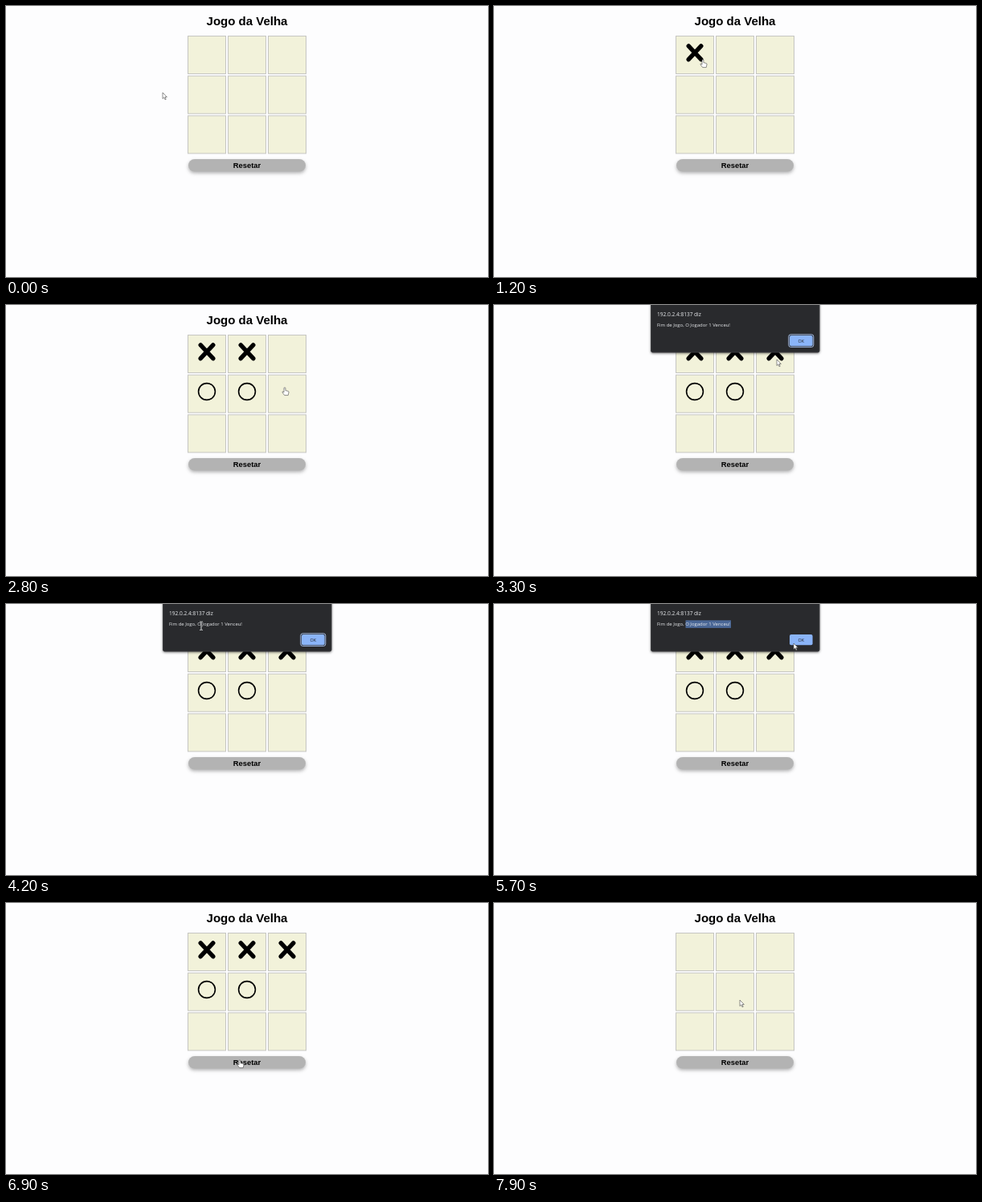
These frames come from a looping animation (600 px wide and 338 px high, 8 s). An HTML page:

```html
<!DOCTYPE html>
<html lang="pt">
<head>
<meta charset="utf-8">
<title>Jogo da Velha</title>
<style>
  html, body { margin: 0; width: 100%; height: 100%; overflow: hidden; background: #fdfdfe; }
  svg { display: block; width: 100vw; height: 100vh; }
  .page { font-family: Arial, "Liberation Sans", sans-serif; font-weight: 700; text-anchor: middle; }
  .cell { fill: #f2f2da; stroke: #c6c6c2; }
  .x { fill: none; stroke: #000; stroke-width: 5.4; stroke-linecap: round; }
  .o { fill: none; stroke: #000; stroke-width: 1.6; }
  .reset { fill: #b3b3b3; filter: drop-shadow(0 2px 2px rgba(0, 0, 0, .3)); }
  .dialog { font-family: "Open Sans", "Noto Sans", sans-serif; fill: #e8eaed; }
  .panel { fill: #292a2d; stroke: #3a3b3e; filter: drop-shadow(0 1px 1.5px rgba(0, 0, 0, .5)); }
  .cursor { fill: #fff; stroke: #444; stroke-width: .6; stroke-linejoin: round; }
</style>
</head>
<body>
<svg viewBox="0 0 600 338">
  <g class="page">
    <text x="300" y="24" font-size="15">Jogo da Velha</text>
    <g id="board"></g>
    <rect class="reset" x="227" y="191" width="146" height="15.5" rx="7.75"/>
    <text x="300" y="202.2" font-size="9.4">Resetar</text>
  </g>
  <g class="dialog" id="dialog">
    <path class="panel" d="M195.5 -2V57q0 2 2 2H403q2 0 2-2V-2Z"/>
    <text x="203" y="14.3" font-size="6.55">192.0.2.4:8137 diz</text>
    <rect id="selection" x="238.5" y="20.3" height="9.6" fill="#4a6796"/>
    <text x="203" y="27.3" font-size="5.95">Fim de Jogo, O Jogador 1 Venceu!</text>
    <rect id="ring" x="366.8" y="36.8" width="31" height="15.6" rx="2.5" fill="none" stroke="#b5cffa" stroke-width=".9"/>
    <rect x="368" y="38" width="28.6" height="13.2" rx="2" fill="#8ab4f8"/>
    <text x="382.3" y="46.7" font-size="5.4" text-anchor="middle" fill="#202124">OK</text>
  </g>
  <g class="cursor" id="cursor">
    <path id="arrow" d="M0 0V7.6L1.8 5.9 3 8.8 4.2 8.3 3 5.5H5.3Z"/>
    <path id="hand" d="M-1 .8a.95.95 0 0 1 1.9 0V3.6l3.2.8q1.1.4.9 1.5L4.2 9.6H-.3L-3 6q-.3-1.2.9-1L-1 5.9Z"/>
    <path id="beam" d="M-1.8-5Q-.2-5 0-4.3 .2-5 1.8-5M0-4.3V4.8M-1.8 5.5Q-.2 5.5 0 4.8 .2 5.5 1.8 5.5" fill="none" stroke="#f1f3f4" stroke-width=".9"/>
  </g>
</svg>
<script>
  const LOOP = 8000, STEP = 100, CLEAR = 7700;
  const $ = id => document.getElementById(id);
  const board = $('board'), shapes = ['arrow', 'hand', 'beam'];

  // [cell, mark, time placed]
  const moves = [[0, 'x', 1200], [3, 'o', 1600], [1, 'x', 2000], [4, 'o', 2400], [2, 'x', 3100]];

  // [time, x, y, shape shown from here on]
  const path = [
    [0, 195, 108, 'arrow'], [100, 196, 107, 'arrow'], [300, 227, 88, 'hand'], [600, 260, 67, 'hand'],
    [1200, 260, 67, 'hand'], [1400, 252, 102, 'hand'], [1600, 252, 102, 'hand'],
    [1900, 302, 66, 'hand'], [2000, 303, 65, 'hand'], [2300, 307, 104, 'hand'], [2500, 309, 104, 'hand'],
    [2800, 347, 103, 'hand'], [3000, 352, 68, 'hand'], [3200, 352, 68, 'arrow'], [3400, 352, 68, 'arrow'],
    [3700, 318, 42, 'arrow'], [4000, 256, 28, 'beam'], [4200, 243, 27, 'beam'], [4400, 239, 26, 'beam'],
    [5000, 294, 26, 'beam'], [5100, 295, 26, 'arrow'], [5500, 373, 49, 'arrow'], [5700, 373, 49, 'arrow'],
    [6000, 379, 44, 'arrow'], [6200, 379, 44, 'arrow'], [6500, 348, 142, 'hand'], [6700, 312, 190, 'hand'],
    [6900, 291, 196, 'hand'], [7200, 300, 195, 'hand'], [7400, 301, 195, 'hand'], [7600, 302, 195, 'hand'],
    [7700, 303, 176, 'hand'], [7800, 305, 145, 'arrow'], [7900, 306, 121, 'arrow'], [8000, 306, 121, 'arrow']
  ];

  function add(tag, attrs) {
    const el = document.createElementNS('http://www.w3.org/2000/svg', tag);
    for (const key in attrs) el.setAttribute(key, attrs[key]);
    return board.appendChild(el);
  }

  const corner = i => [226.5 + 50 * (i % 3), 37.5 + 49.7 * Math.floor(i / 3)];

  for (let i = 0; i < 9; i++) {
    const [x, y] = corner(i);
    add('rect', { class: 'cell', x, y, width: 47, height: 47 });
  }

  const marks = moves.map(([cell, type, start]) => {
    const [x, y] = corner(cell), cx = x + 23.5, cy = y + 20.8;
    const el = type === 'x'
      ? add('path', { class: 'x', d: `M${cx - 7.8} ${cy - 8.4}l15.6 16.8m0-16.8l-15.6 16.8` })
      : add('circle', { class: 'o', cx, cy, r: 10.4 });
    return { el, start };
  });

  const show = (el, on) => el.setAttribute('visibility', on ? 'visible' : 'hidden');

  function cursorAt(t) {
    const i = path.findIndex(p => p[0] > t);
    const [t0, x0, y0, shape] = path[i - 1], [t1, x1, y1] = path[i];
    const k = (t - t0) / (t1 - t0);
    return { x: x0 + (x1 - x0) * k, y: y0 + (y1 - y0) * k, shape };
  }

  function draw(now) {
    const t = Math.floor(now % LOOP / STEP) * STEP;
    const { x, y, shape } = cursorAt(t);

    marks.forEach(m => show(m.el, t >= m.start && t < CLEAR));
    $('dialog').style.display = t >= 3200 && t < 6200 ? '' : 'none';
    show($('ring'), t < 4400);
    $('selection').setAttribute('width', t < 4400 ? 0 : Math.max(0, Math.min(56.5, (t < 5000 ? x : 295) - 238.5)));

    $('cursor').setAttribute('transform', `translate(${x} ${y})`);
    shapes.forEach(id => show($(id), id === shape));
    requestAnimationFrame(() => draw(performance.now()));
  }
  draw(performance.now());
</script>
</body>
</html>
```
